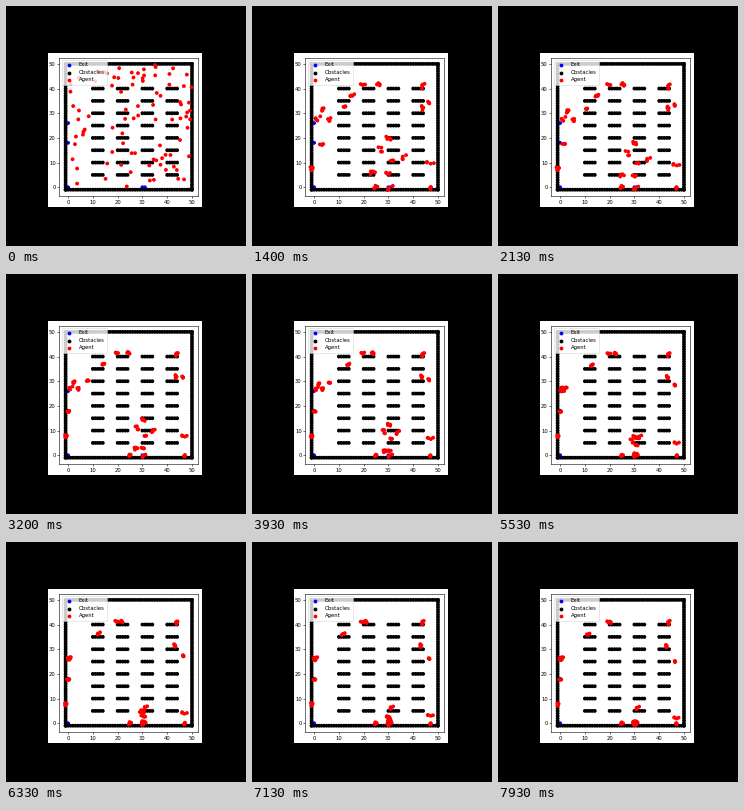
Write a matplotlib script that moves like this. It is 240x240 px and loops after 8000 ms.

```python
import matplotlib.pyplot as plt
import numpy as np
from matplotlib.animation import FuncAnimation
from matplotlib.patches import Rectangle

SIZE, DPI, FRAMES, LOOP = 240, 100, 120, 8000
FONT, DOT = 3.75, 7.6
LIM = (-3.55, 52.55)
GATHER = 1.4   # seconds until the agents have formed groups
PER_GROUP = 4

EXITS = np.array([(0, 26), (0, 18), (0, 0), (30, 0), (31, 0)])

# Where groups end up, how many seconds they take, where they gather first
FLOWS = [
    ((.4, 26.2), 4.9, [(1.2, 28), (6, 27.3), (4, 31.5), (12.5, 32.5)]),
    ((.4, 17.5), 1.3, [(3.5, 17)]),
    ((-.6, 8), 1, [(-.6, 8)]),
    ((11.3, 36.2), 6.5, [(15.3, 37.5)]),
    ((19.8, 41), 6.5, [(20, 41.5), (25.5, 41.8)]),
    ((43.7, 40.5), 1, [(43.7, 40.5)]),
    ((46.3, 24.8), 6.5, [(46, 34)]),
    ((43, 31.2), 6.5, [(43.8, 32)]),
    ((47, 2.3), 6.5, [(47, 10)]),
    ((47, -.2), 1, [(47, -.2)]),
    ((30.4, .2), 6.5, [(27, 15.5), (31.5, 11), (30.7, 20.5)]),
    ((31, 6), 5, [(36, 11.8)]),
    ((30.4, .2), 3.3, [(24, 6), (29.8, 5), (30.3, .3)]),
    ((25, -.2), 1, [(25, -.2)]),
]


def shelves():
    return np.array([(x + d, y) for y in range(5, 41, 5)
                     for x in range(10, 41, 10) for d in range(5)])


def walls():
    return np.array([p for v in range(-1, 51)
                     for p in ((v, -1), (v, 50), (-1, v), (50, v))])


def scatter_agents(count, rng):
    """Random points inside the room, denser to the right, off the shelves."""
    spots = 50 * rng.random((3 * count, 2)) ** (.75, .9)
    gap = np.linalg.norm(spots[:, None] - shelves()[None], axis=2).min(1)
    return spots[gap > 1][:count]


def assign(starts, heads):
    """The groups take turns picking their nearest free agent."""
    dist = np.linalg.norm(starts[:, None] - heads[None], axis=2)
    team = np.full(len(starts), -1)
    for turn in range(len(starts)):
        g = turn % len(heads)
        team[np.where(team < 0, dist[:, g], np.inf).argmin()] = g
    return team


rng = np.random.default_rng(7)
groups = [(head, end, secs) for end, secs, heads in FLOWS for head in heads]
heads, ends, secs = (np.array(col, float) for col in zip(*groups))
starts = scatter_agents(PER_GROUP * len(groups), rng)
team = assign(starts, heads)
spread = np.clip(rng.normal(0, .6, starts.shape), -1.2, 1.2)


def positions(i):
    if i == 0:
        return starts
    t = i * LOOP / FRAMES / 1000
    shake = np.random.default_rng(100 + i).normal(0, .08, starts.shape)
    gather = 1 - (1 - min(t / GATHER, 1)) ** 1.4
    drift = np.clip((t - GATHER) / secs, 0, 1)[:, None]
    centre = (heads + (ends - heads) * drift)[team]
    tight = np.interp(t, [GATHER, 3], [1.2, .8])
    return starts + (centre + spread * tight - starts) * gather + shake


fig = plt.figure(figsize=(SIZE / DPI, SIZE / DPI), dpi=DPI, facecolor="black")
fig.add_artist(Rectangle((42 / SIZE, 39 / SIZE), 154 / SIZE, 154 / SIZE,
                         fc="white", lw=0, zorder=-1))
ax = fig.add_axes([53.3 / SIZE, 50 / SIZE, 139 / SIZE, 138.4 / SIZE])
ax.set(xlim=LIM, ylim=LIM, xticks=range(0, 51, 10), yticks=range(0, 51, 10))
ax.tick_params(labelsize=FONT, length=1.3, pad=1.3, width=.4)
for spine in ax.spines.values():
    spine.set_linewidth(.4)


def dots(points, color, label):
    # One size per point keeps the dots at sub-pixel positions
    return ax.scatter(*points.T, s=np.full(len(points), DOT), c=color,
                      linewidths=0, label=label)


dots(EXITS, "blue", "Exit")
dots(np.vstack([walls(), shelves()]), "black", "Obstacles")
agents = dots(starts, "red", "Agent")
ax.legend(loc="upper left", fontsize=FONT).get_frame().set_linewidth(.4)


def update(i):
    agents.set_offsets(positions(i))
    return [agents]


anim = FuncAnimation(fig, update, frames=FRAMES, interval=LOOP / FRAMES,
                     repeat=True, repeat_delay=0)
plt.show()
```
